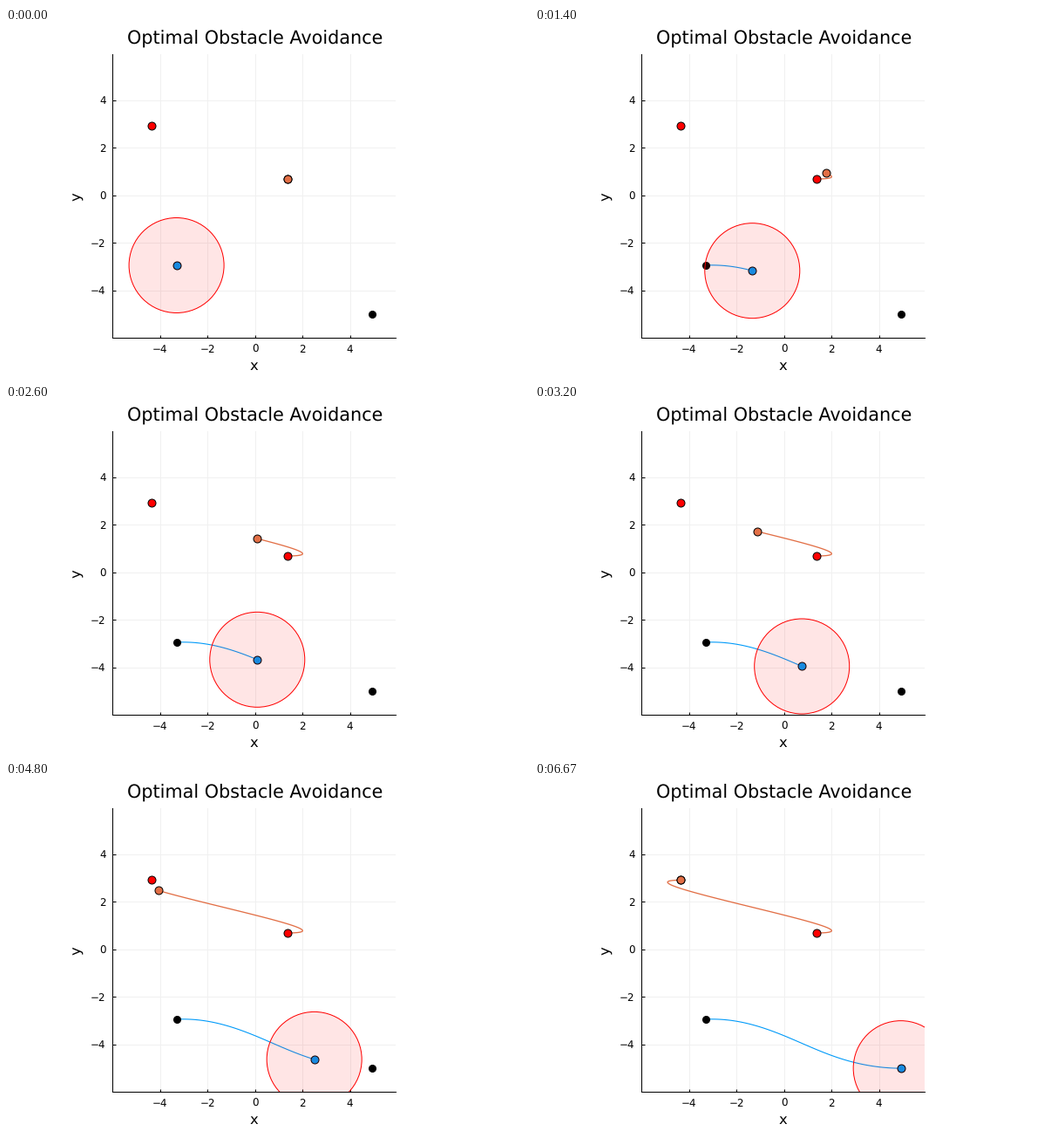
A matplotlib script that plays this animation: 600 by 400 pixels, repeating every 6740 ms.

```python
import numpy as np
import matplotlib.pyplot as plt
from matplotlib.animation import FuncAnimation
from matplotlib.patches import Circle

W, H = 600, 400
PX = 0.72                 # points per pixel at 100 dpi
UNIT = 27.25              # pixels per data unit
LEFT, BOTTOM, SIDE = 122, 355, 325
X0, Y0 = 285.6, 191.8     # data zero in pixels
LOOP, TICK = 6740, 20     # ms
STEPS, FPS = 101, 15      # path steps, shown at 15 per second

BLUE, ORANGE = "#009af9", "#e26f46"

plt.rcParams["font.family"] = "DejaVu Sans"
plt.rcParams["text.hinting"] = "none"


def smooth(knots, values, s):
    """Smooth polynomial course through a few waypoints."""
    return np.polyval(np.polyfit(knots, values, len(knots) - 1), s)


s = np.linspace(0, 1, STEPS)
knots = [0, 0.12, 0.30, 0.48, 0.72, 0.88, 1]
robot = np.array([
    smooth(knots, [-3.303, -2.13, -0.594, 0.756, 2.498, 3.809, 4.92], s),
    smooth(knots, [-2.943, -3.003, -3.402, -3.952, -4.628, -4.922, -5.003], s),
])
rover = np.array([
    smooth(knots, [1.387, 2.006, 1.08, -1.11, -4.06, -4.898, -4.37], s),
    smooth(knots, [0.69, 0.775, 1.156, 1.717, 2.473, 2.815, 2.912], s),
])

fig = plt.figure(figsize=(W / 100, H / 100), dpi=100, facecolor="white")
ax = fig.add_axes([LEFT / W, 1 - BOTTOM / H, SIDE / W, SIDE / H])
xmin, ymin = (LEFT - X0) / UNIT, (Y0 - BOTTOM) / UNIT
ax.set_xlim(xmin, xmin + SIDE / UNIT)
ax.set_ylim(ymin, ymin + SIDE / UNIT)
ax.set_xticks(range(-4, 5, 2))
ax.set_yticks(range(-4, 5, 2))
ax.set_axisbelow(True)
ax.grid(color="#f0f0f0", linewidth=PX)
ax.tick_params(direction="in", length=3.5 * PX, width=PX,
               labelsize=11.85 * PX, pad=7.5 * PX)
for side in ("top", "right"):
    ax.spines[side].set_visible(False)
for side in ("left", "bottom"):
    ax.spines[side].set_linewidth(PX)


def label(x, y, text, size, **kw):
    fig.text(x / W, 1 - y / H, text, fontsize=size * PX,
             ha="center", va="baseline", **kw)


label(285.2, 18.3, "Optimal Obstacle Avoidance", 20.75)
label(284.8, 391.8, "x", 16.4)
label(86, 192.7, "y", 16.4, rotation=90, rotation_mode="anchor")


def dot(x, y, color, size, z):
    line, = ax.plot([x], [y], "o", color=color, markersize=size * PX,
                    markeredgecolor="black", markeredgewidth=PX,
                    zorder=z, snap=False)
    return line


def trail(color, width):
    line, = ax.plot([], [], color=color, linewidth=width * PX, zorder=2.1)
    return line


for path, color, size in ((robot, "black", 8), (rover, "red", 9)):
    dot(*path[:, 0], color, size, 3)
    dot(*path[:, -1], color, size, 3)

movers = [
    (robot, trail(BLUE, 1.1), dot(*robot[:, 0], BLUE, 9, 4)),
    (rover, trail(ORANGE, 1.3), dot(*rover[:, 0], ORANGE, 9, 4)),
]
zone = Circle(robot[:, 0], 2, facecolor=(1, 0, 0, 0.1), edgecolor="red",
              linewidth=PX, zorder=5)
ax.add_patch(zone)


def update(frame):
    # 14 ms lead absorbs the rounding of step times to the tick
    i = min(int((frame * TICK + 14) * FPS / 1000), STEPS - 1)
    for path, line, marker in movers:
        line.set_data(path[:, :i + 1])
        marker.set_data(path[:, i:i + 1])
    zone.center = robot[:, i]
    return [zone]


anim = FuncAnimation(fig, update, frames=LOOP // TICK, interval=TICK,
                     init_func=lambda: update(0), repeat=True, repeat_delay=0)
plt.show()
```
